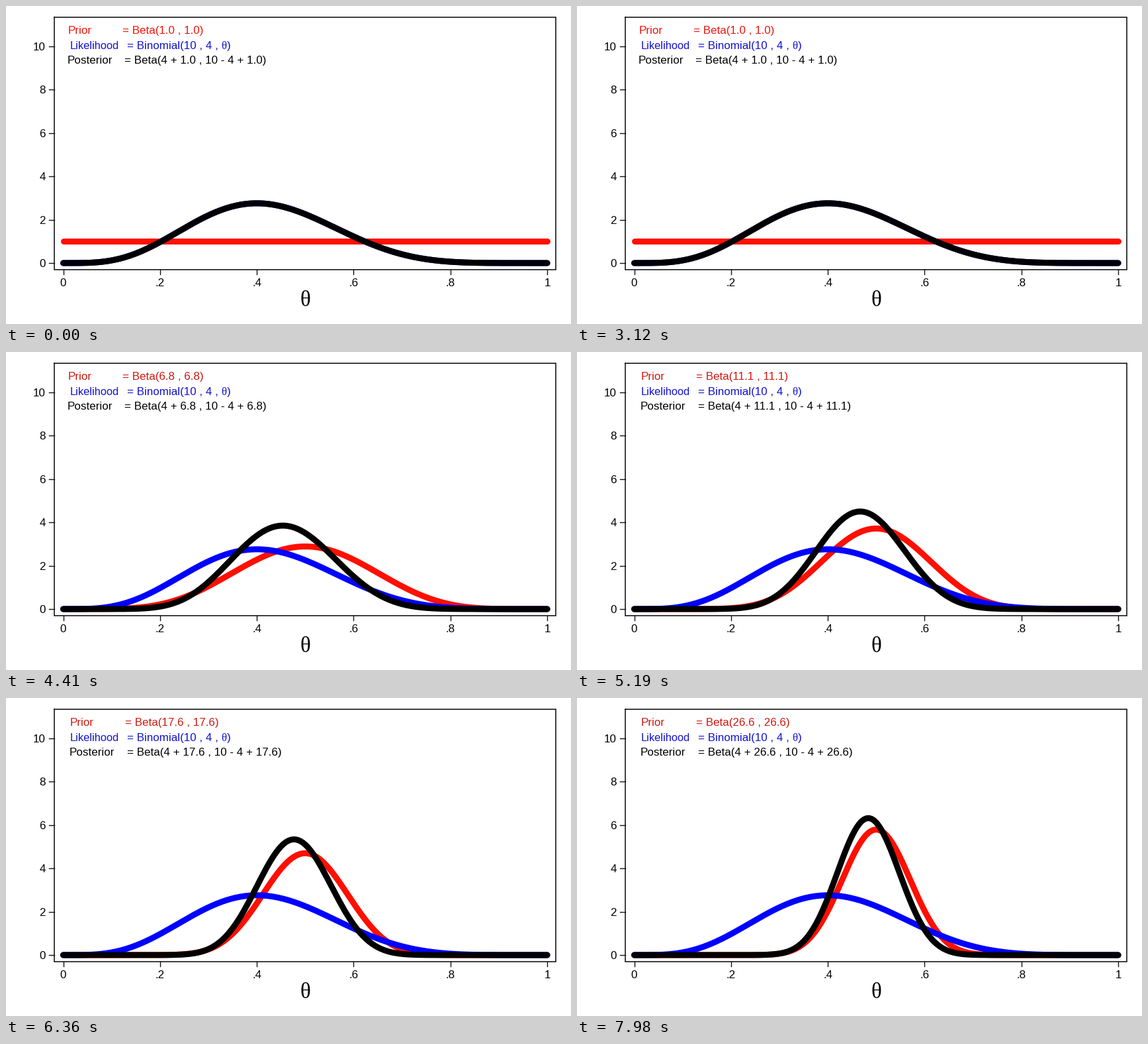
A matplotlib script for the animation above (8000 ms loop, 854 by 480 pixels).

```python
import math

import numpy as np
import matplotlib.pyplot as plt
from matplotlib.animation import FuncAnimation

W, H, DPI = 854, 480, 100
LOOP, INTERVAL = 8000, 20
SHOT = 30                      # the picture is refreshed every 30 ms
START, PER_UNIT = 3364, 180.3  # ms at which the prior starts, ms per unit

X0, X1, Y0, UNIT = 86.5, 818, 388, 32.7
BOX = (73, 17.5, 830.5, 398)
RED, BLUE, BLACK = "#ff0f00", "#0000ff", "#000000"
RED_TEXT, RED_TEXT_DIM, BLUE_TEXT = "#f01408", "#cc1a10", "#1212d0"

theta = np.linspace(0, 1, 201)


def pt(px):
    return px * 72 / DPI


# The small excess keeps the pixel size from being rounded down
fig = plt.figure(figsize=((W + 0.01) / DPI, (H + 0.01) / DPI), dpi=DPI,
                 facecolor="white")
ax = fig.add_axes([0, 0, 1, 1])
ax.set_xlim(0, W)
ax.set_ylim(H, 0)
ax.axis("off")


def px_x(v):
    return X0 + (X1 - X0) * v


def px_y(v):
    return Y0 - UNIT * v


def label(x, y, s, color=BLACK, size=17, font="Liberation Sans", **kw):
    kw.setdefault("va", "baseline")
    return ax.text(x, y, s, color=color, fontsize=pt(size), family=font, **kw)


def stroke(xs, ys, width=1.4, color="#111111", **kw):
    return ax.plot(xs, ys, color=color, lw=pt(width), **kw)[0]


def curve(color):
    return stroke([], [], 9, color, solid_capstyle="round",
                  solid_joinstyle="round")


def beta_pdf(a, b):
    c = math.exp(math.lgamma(a + b) - math.lgamma(a) - math.lgamma(b))
    return c * theta ** (a - 1) * (1 - theta) ** (b - 1)


# Frame, ticks and axis labels
left, top, right, bottom = BOX
stroke([left, right, right, left, left], [top, top, bottom, bottom, top], 1.6,
       solid_joinstyle="miter")
stroke([853.5, 853.5], [0, H], 1, "#555555")
for v in range(0, 11, 2):
    stroke([left - 8, left], [px_y(v)] * 2)
    label(left - 13, px_y(v) + 6, str(v), ha="right")
for i, s in enumerate(["0", ".2", ".4", ".6", ".8", "1"]):
    x = px_x(i / 5)
    stroke([x, x], [bottom, bottom + 7])
    label(x, 422.5, s, ha="center")
label(452.5, 453, "θ", size=33, font="Liberation Serif", ha="center")

# Curves
prior, likelihood, posterior = curve(RED), curve(BLUE), curve(BLACK)
likelihood.set_data(px_x(theta), px_y(beta_pdf(5, 7)))

# Legend
prior_name = label(93.5, 41.5, "Prior")
prior_text = label(176.2, 41.5, "")
label(96.7, 64.5, "Likelihood", BLUE_TEXT, 16.4)
label(183.2, 64.5, "= Binomial(10 , 4 , ", BLUE_TEXT)
label(325.5, 64.5, "θ", BLUE_TEXT, font="Liberation Serif")
label(334, 64.5, ")", BLUE_TEXT)
post_name = label(92.7, 87, "Posterior")
post_text = label(179.4, 87, "")


def draw(i):
    t = (i + 0.5) * INTERVAL // SHOT * SHOT
    a = round(max(1.0, 1 + (t - START) / PER_UNIT), 1)
    prior.set_data(px_x(theta), px_y(beta_pdf(a, a)))
    posterior.set_data(px_x(theta), px_y(beta_pdf(4 + a, 6 + a)))

    prior_text.set_text(f"= Beta({a:.1f} , {a:.1f})")
    post_text.set_text(f"= Beta(4 + {a:.1f} , 10 - 4 + {a:.1f})")
    shift = 3.4 if a >= 10 else 0
    prior_name.set_x(93.5 + shift)
    prior_text.set_x(176.2 + shift)
    post_name.set_x(92.7 + shift)
    post_text.set_x(179.4 + shift)
    for txt in (prior_name, prior_text):
        txt.set_color(RED_TEXT if a == 1 else RED_TEXT_DIM)
    return prior, posterior, prior_name, prior_text, post_name, post_text


anim = FuncAnimation(fig, draw, frames=LOOP // INTERVAL, interval=INTERVAL,
                     repeat=True, repeat_delay=0)
plt.show()
```
